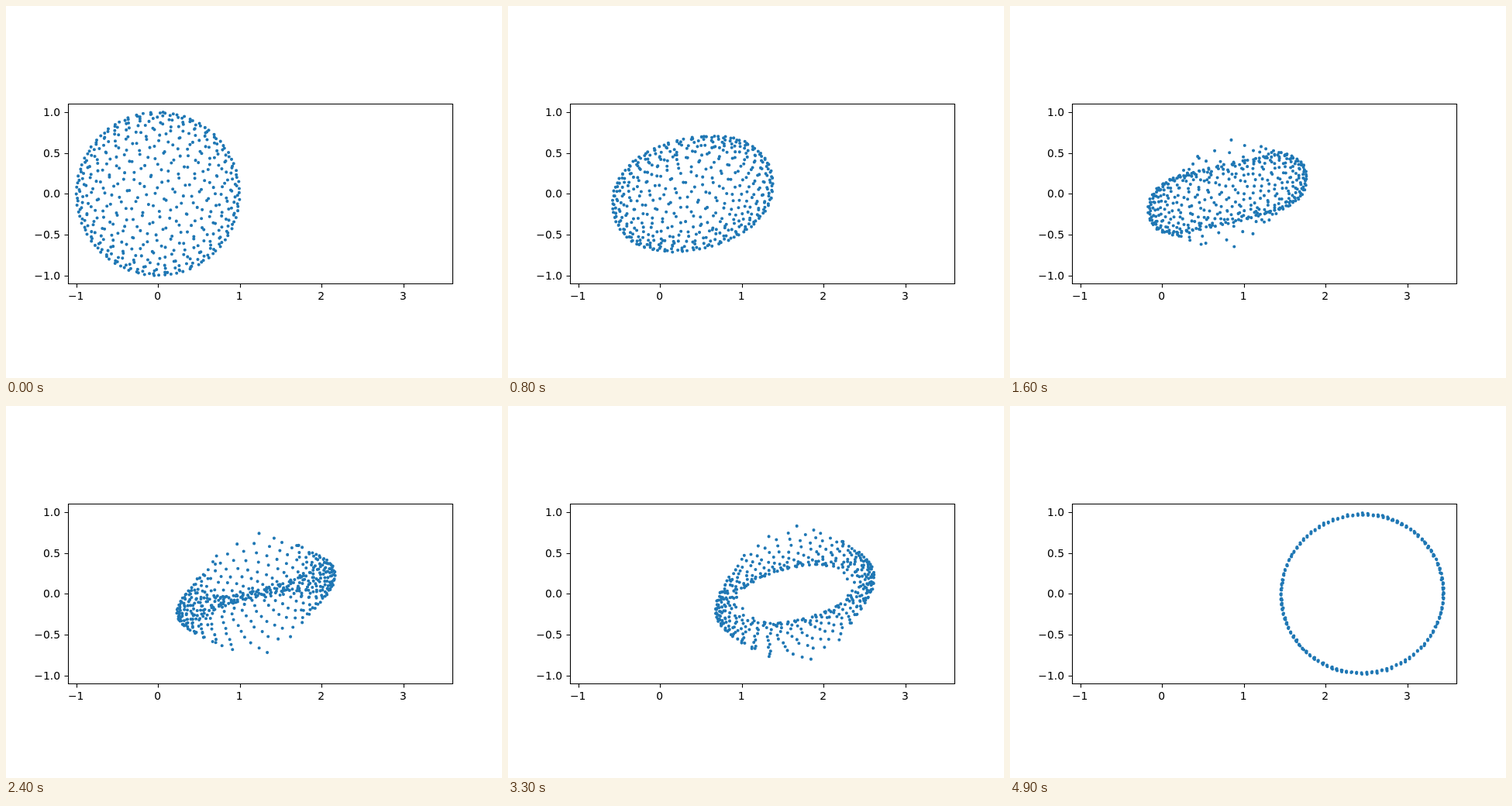
Animation of 640x480 px, one loop 5000 ms. Source, as an HTML page:

```html
<!DOCTYPE html>
<html lang="en">
<head>
<meta charset="utf-8">
<title>Sphere to circle</title>
<style>
html, body { margin: 0; width: 100%; height: 100%; overflow: hidden; background: #fff; }
svg { display: block; }
text { font: 13.89px "DejaVu Sans", sans-serif; }
#axes { fill: none; stroke: #000; stroke-width: 1.1; }
#dots { fill: none; stroke: #1f77b4; stroke-width: 4.1; stroke-linecap: round; }
</style>
</head>
<body>
<svg width="640" height="480" viewBox="0 0 640 480">
  <path id="dots"/>
  <path id="axes"/>
  <g id="labels"></g>
</svg>
<script>
const FRAMES = 50, STEP = 100, SHIFT = 2.5;
const COUNT = 500, RING = 100;
const TAU = 2 * Math.PI;
const px = x => 196.1 + 105.53 * x;
const py = y => 242.4 - 105.53 * y;
const get = id => document.getElementById(id);

function drawAxes() {
  let d = 'M80.5 126.5H576.5V358.5H80.5Z', labels = '';
  const label = (text, x, y, anchor) => {
    labels += `<text x="${x}" y="${y}" text-anchor="${anchor}">${text.replace('-', '\u2212')}</text>`;
  };
  for (let x = -1; x <= 3; x++) {
    d += `M${Math.round(px(x)) + .5} 358.5v5`;
    label(String(x), px(x) - .4, 379, 'middle');
  }
  for (let y = -1; y <= 1; y += .5) {
    const row = Math.round(py(y));
    d += `M80.5 ${row + .5}h-5`;
    label(y.toFixed(1), 70, row + 5, 'end');
  }
  get('axes').setAttribute('d', d);
  get('labels').innerHTML = labels;
}

// Fibonacci sphere around the y axis, with each point's angle in a tilted, turned plane.
const GOLDEN = Math.PI * (3 - Math.sqrt(5));
const TILT = Math.asin(.61), TURN = 28 * Math.PI / 180;
const points = Array.from({ length: COUNT }, (_, i) => {
  const y = (2 * i + 1) / COUNT - 1;
  const r = Math.sqrt(1 - y * y);
  const lon = (i + 1) % COUNT * GOLDEN;
  const x = r * Math.cos(lon), z = r * Math.sin(lon);
  const angle = TURN - Math.atan2(y * Math.cos(TILT) - z * Math.sin(TILT), x);
  return { x, y, order: (angle + TAU / RING / 2 + 2 * TAU) % TAU };
});

// Every place on the ring takes an equal share of the points.
points.sort((a, b) => a.order - b.order).forEach((p, rank) => {
  const spot = Math.floor(rank * RING / COUNT) / RING * TAU;
  p.endX = SHIFT + Math.cos(spot);
  p.endY = Math.sin(spot);
});

function draw(now) {
  const t = Math.floor(now / STEP) % FRAMES / FRAMES;
  const mix = (a, b) => a + (b - a) * t;
  get('dots').setAttribute('d', points.map(p =>
    `M${px(mix(p.x, p.endX)).toFixed(2)} ${py(mix(p.y, p.endY)).toFixed(2)}h0`).join(''));
}

drawAxes();
const start = performance.now();
draw(0);
requestAnimationFrame(function tick(now) {
  draw(Math.max(0, now - start));
  requestAnimationFrame(tick);
});
</script>
</body>
</html>
```
